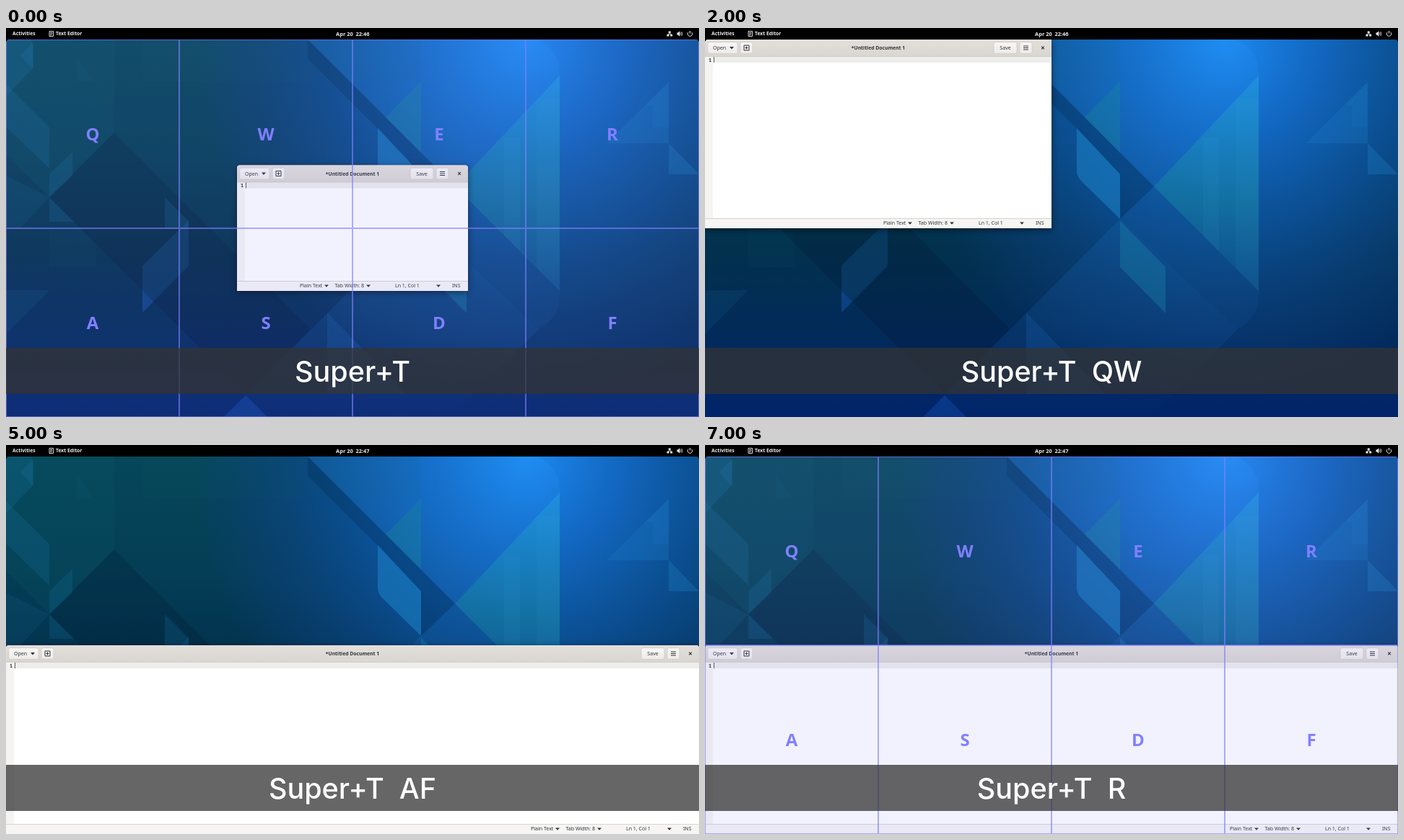
Recreate the animation shown at these times as an HTML page. Size 960 px wide and 540 px high, loop 8 s.

```html
<!DOCTYPE html>
<html lang="en">
<head>
<meta charset="utf-8">
<title>Tiling with the keyboard</title>
<style>
  html, body { margin: 0; width: 100%; height: 100%; overflow: hidden; background: #000; }
  svg { display: block; width: 960px; height: 540px; }
  text { font: 7px "Noto Sans", sans-serif; fill: #2e3436; }
  .bold { font-weight: bold; font-size: 6.8px; }
  .mid { text-anchor: middle; }
  #panel text { fill: #eee; }
  #panel .clock { font-size: 7.4px; }
  #cells text { font-size: 24px; font-weight: bold; fill: #8080ff; }
  #cells rect { fill: rgba(128, 128, 255, .1); stroke: rgba(128, 128, 255, .65); }
  #keys { font: 500 39.5px Inter, sans-serif; fill: #fff; }
  .button { fill: url(#button); stroke: #cdc7c2; stroke-width: .7; }
  .icon { fill: none; stroke: #2e3436; }
  .tray { fill: none; stroke: #eee; }
  #shadow { filter: drop-shadow(0 2px 4px rgba(0, 0, 0, .55)); }
</style>
</head>
<body>
<svg viewBox="0 0 960 540">
  <defs>
    <linearGradient id="base" x2="0" y2="1">
      <stop stop-color="#06475a"/>
      <stop offset=".32" stop-color="#043d55"/>
      <stop offset=".55" stop-color="#02314d"/>
      <stop offset=".75" stop-color="#022b58"/>
      <stop offset="1" stop-color="#01246a"/>
    </linearGradient>
    <radialGradient id="glow" gradientUnits="userSpaceOnUse" cx="0" cy="0" r="1"
        gradientTransform="translate(720 14) scale(460 500)">
      <stop stop-color="#1c8af2"/>
      <stop offset=".28" stop-color="#136aca" stop-opacity=".92"/>
      <stop offset=".6" stop-color="#0b4d94" stop-opacity=".8"/>
      <stop offset=".85" stop-color="#0d4080" stop-opacity=".4"/>
      <stop offset="1" stop-color="#0d4080" stop-opacity="0"/>
    </radialGradient>
    <linearGradient id="ribbon" x2="0" y2="1">
      <stop stop-color="#2a9cff" stop-opacity=".18"/>
      <stop offset=".75" stop-color="#1a60b0" stop-opacity=".2"/>
      <stop offset="1" stop-color="#1a60b0" stop-opacity="0"/>
    </linearGradient>
    <linearGradient id="teal" x2="0" y2="1">
      <stop stop-color="#25a0e0" stop-opacity=".5"/>
      <stop offset=".6" stop-color="#168a94" stop-opacity=".4"/>
      <stop offset="1" stop-color="#126a90" stop-opacity=".15"/>
    </linearGradient>
    <linearGradient id="header" x2="0" y2="1">
      <stop stop-color="#e3dfdb"/><stop offset="1" stop-color="#d9d5d0"/>
    </linearGradient>
    <linearGradient id="button" x2="0" y2="1">
      <stop stop-color="#f8f7f6"/><stop offset="1" stop-color="#edebe9"/>
    </linearGradient>
    <clipPath id="screen"><path d="M0 540V21q0-5 5-5H955q5 0 5 5V540z"/></clipPath>
  </defs>

  <rect width="960" height="540"/>
  <g clip-path="url(#screen)">
    <path fill="url(#base)" d="M0 16H960V540H0z"/>
    <path fill="url(#glow)" d="M0 16H960V540H0z"/>
    <!-- left facets -->
    <g fill="#0d5c6c">
      <path opacity=".2" d="M0 16H150V145L60 235 0 175z"/>
      <path opacity=".08" d="M190 74H574V16H190zM60 278h65v54H60z"/>
    </g>
    <path fill="#000c20" opacity=".16" d="M150 145L60 235 332 508 422 418z"/>
    <g fill="#1978a8">
      <path opacity=".22" d="M0 16H32Q38 18 38 28V55L0 95z"/>
      <path opacity=".2" d="M20 38L37 20V57z"/>
      <path opacity=".2" d="M0 78L60 138V195L0 137z"/>
      <path opacity=".2" d="M92 172V205L60 235V203zM60 235l34 34H60zM220 235l33 33v10H220z"/>
      <path opacity=".12" d="M0 364H60L0 425zM0 205L60 235 20 278H0z"/>
      <path opacity=".06" d="M98 74V40L122 74z"/>
    </g>
    <path fill="#1865a8" opacity=".25" d="M253 267V330L189 395V330z"/>
    <path fill="#1450b8" opacity=".3" d="M189 365L204 380 189 395z"/>
    <!-- central ribbon -->
    <path fill="url(#ribbon)" d="M418 16H735Q767 30 767 62V372Q767 402 738 418L616 540H302L575 265 622 220z"/>
    <path fill="#002850" opacity=".3" d="M418 16L485 83 622 220 575 265 515 205V140L418 43z"/>
    <path fill="#002850" opacity=".1" d="M622 220L767 365V372Q767 402 738 418L575 265z"/>
    <path fill="url(#teal)" d="M767 66V365L622 220z"/>
    <path fill="#38a8e0" opacity=".07" d="M690 152H712V310L690 288zM735 98H767V365L735 333z"/>
    <path fill="#1d8c94" opacity=".3" d="M575 74V173L526 124z"/>
    <path fill="#1b80c8" opacity=".65" d="M515 139L575 203V265L524 215Q515 207 515 200z"/>
    <path fill="#1c86a8" opacity=".35" d="M575 268L638 332V396L575 332z"/>
    <path fill="#1c70c0" opacity=".22" d="M445 395L555 508H445z"/>
    <path fill="#1458c0" opacity=".35" d="M332 510L362 540H302z"/>
    <!-- right facets -->
    <g fill="#1f80c8">
      <path opacity=".25" d="M918 75V160H832z"/>
      <path opacity=".3" d="M918 160L960 203H918z"/>
      <path opacity=".12" d="M832 107H886L918 75V138H896V107z"/>
    </g>

    <g id="window">
      <path id="shadow"/>
      <path id="frame" fill="#fff"/>
      <path id="gutter" fill="#f5f4f2"/>
      <path id="line" fill="#ededeb"/>
      <path id="top" fill="url(#header)"/>
      <path id="status" fill="#f6f5f4"/>
      <path id="rules" fill="none" stroke="#cfcac5" stroke-width=".8"/>
      <text id="title" class="bold mid" y="14">*Untitled Document 1</text>
      <g id="left">
        <rect class="button" x="3.7" y="3.7" width="41.3" height="15.8" rx="2.5"/>
        <rect class="button" x="49" y="3.7" width="17" height="15.8" rx="2.5"/>
        <text x="11" y="14">Open</text>
        <path fill="#2e3436" d="M34 10h6l-3 3.4z"/>
        <path class="icon" d="M54 8h7v7h-7zM57.5 9.5v4M55.5 11.5h4"/>
        <text x="5" y="30.6" class="bold" style="font-family:'Noto Sans Mono',monospace">1</text>
        <path stroke="#222" stroke-width=".7" d="M12.5 24v8"/>
      </g>
      <g id="right">
        <rect class="button" x="-80" y="3.7" width="32" height="15.8" rx="2.5"/>
        <rect class="button" x="-44" y="3.7" width="17" height="15.8" rx="2.5"/>
        <text class="mid" x="-64" y="14">Save</text>
        <path class="icon" d="M-39 9h7M-39 11.5h7M-39 14h7"/>
        <path class="icon" stroke-width="1.2" d="M-13.8 9.7l3.6 3.6m0-3.6l-3.6 3.6"/>
      </g>
      <g id="corner">
        <text x="-233" y="-4.6">Plain Text</text>
        <text x="-184.5" y="-4.6">Tab Width: 8</text>
        <text x="-101" y="-4.6">Ln 1, Col 1</text>
        <text x="-22" y="-4.6">INS</text>
        <path fill="#2e3436" d="M-199-8.6h6l-3 3.4zM-141-8.6h6l-3 3.4zM-44-8.6h6l-3 3.4z"/>
      </g>
    </g>
    <g id="cells"></g>
  </g>

  <g id="panel">
    <text class="bold" x="9" y="10.4">Activities</text>
    <path class="tray" stroke-width=".9" d="M60 4.5h5.5v7H60zM61.2 6.5h3M61.2 8.2h3M61.2 9.8h2"/>
    <text class="bold" x="69" y="10.4">Text Editor</text>
    <text class="bold mid clock" id="clock" x="480.3" y="10.5"></text>
    <path fill="#eee" d="M917.8 4.5h3v2.6h-3zM915.5 9h3v2.6h-3zM920.2 9h3v2.6h-3zM929.5 6.5h1.5l2.4-2.3v7.6L931 9.5h-1.5z"/>
    <path class="tray" stroke-width=".8" d="M919.3 7v1.2M917 9V8.2h4.7V9M934.5 6.2q1.3 1.8 0 3.6M935.8 5q2.4 3 0 6"/>
    <path class="tray" d="M945.6 5.6a3.2 3.2 0 1 0 3.8 0M947.5 4v3.6"/>
  </g>
  <rect y="444" width="960" height="64" fill="#333" fill-opacity=".75"/>
  <text id="keys" class="mid" x="480" y="491"></text>
</svg>

<script>
const $ = id => document.getElementById(id);
const STEP = 1000;

// Window boxes: x, y, width, height, top corner radius
const floating = [320, 190.5, 320, 174.5, 4];
const topLeft = [0, 16, 480, 262, 0];
const bottom = [0, 278, 960, 262, 4];

// Each step: window box, whether the grid shows, keys typed after the shortcut, clock
const steps = [
  [floating, true, "", "22:46"],
  [floating, true, "Q", "22:46"],
  [topLeft, false, "QW", "22:46"],
  [topLeft, true, "", "22:46"],
  [topLeft, true, "A", "22:46"],
  [bottom, false, "AF", "22:47"],
  [bottom, true, "", "22:47"],
  [bottom, true, "R", "22:47"],
];

$("cells").innerHTML = [..."QWERASDF"].map((key, i) => {
  const x = i % 4 * 240, y = 16 + (i >> 2) * 262;
  return `<rect x="${x + .5}" y="${y + .5}" width="239" height="261"/>
    <text class="mid" x="${x + 120}" y="${y + 140.4}">${key}</text>`;
}).join("");

const setPath = (id, d) => $(id).setAttribute("d", d);
const move = (id, x, y) => $(id).setAttribute("transform", `translate(${x} ${y})`);

function placeWindow([x, y, w, h, r]) {
  const roof = `V${r}q0-${r} ${r}-${r}H${w - r}q${r} 0 ${r} ${r}`;
  move("window", x, y);
  setPath("shadow", `M0 ${h}${roof}V${h}z`);
  setPath("frame", `M0 ${h}${roof}V${h}z`);
  setPath("top", `M0 23.5${roof}V23.5z`);
  setPath("gutter", `M0 23.5H11V${h - 13.5}H0z`);
  setPath("line", `M11 23.5H${w}v8.5H11z`);
  setPath("status", `M0 ${h - 13.5}H${w}V${h}H0z`);
  setPath("rules", `M0 23.5H${w}M0 ${h - 13.5}H${w}`);
  $("title").setAttribute("x", w / 2);
  move("right", w, 0);
  move("corner", w, h);
}

let shown = -1;
function draw() {
  const index = Math.floor(performance.now() / STEP) % steps.length;
  if (index !== shown) {
    const [box, grid, typed, time] = steps[shown = index];
    placeWindow(box);
    $("cells").style.display = grid ? "" : "none";
    $("keys").textContent = "Super+T" + (typed && "\u00a0\u00a0" + typed);
    $("clock").textContent = "Apr 20\u00a0\u00a0" + time;
  }
  requestAnimationFrame(draw);
}
draw();
</script>
</body>
</html>
```
